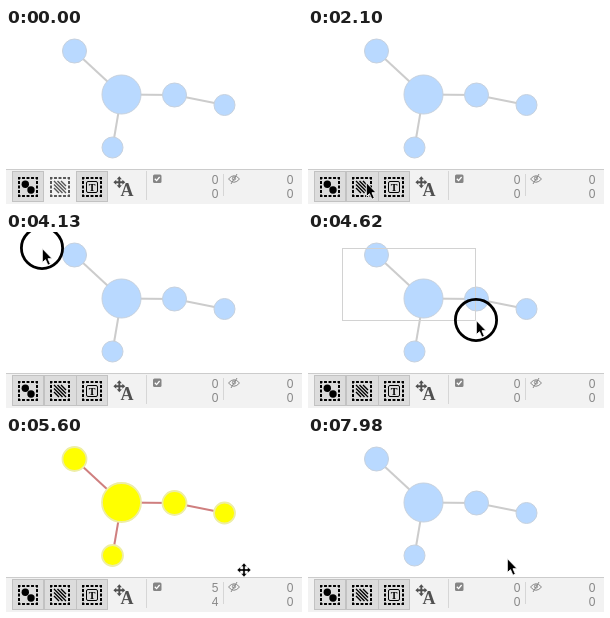
These frames come from a looping animation (296 px wide and 176 px high, 8 s). An HTML page:

```html
<!DOCTYPE html>
<html lang="en">
<head>
<meta charset="utf-8">
<title>Selecting nodes and edges</title>
<style>
  html, body { margin: 0; width: 100%; height: 100%; overflow: hidden; background: #fff; }
  svg { display: block; }
  .edge { stroke: #ccc; stroke-width: 2; }
  .node { fill: #b9d9ff; stroke: #c6d1de; stroke-width: 1; }
  .picked .edge { stroke: #cf7f7f; }
  .picked .node { fill: #ff0; stroke: #eeeea4; stroke-width: 1.8; }
  .button rect.back { fill: none; stroke: none; }
  .button.on rect.back { fill: #dcdcdc; stroke: #c2c2c2; }
  .button { color: #555; }
  .button.on { color: #000; }
  .dash { fill: none; stroke: currentColor; stroke-width: 2; stroke-dasharray: 2.9 1.6; stroke-dashoffset: 1.45; }
  .count { font: 12px "Liberation Sans", Arial, sans-serif; fill: #888; text-anchor: end; }
  .letter { font-family: "Liberation Serif", "Times New Roman", serif; font-weight: bold; text-anchor: middle; }
</style>
</head>
<body>
<svg width="296" height="176" viewBox="0 0 296 176">
  <defs>
    <path id="cross" d="M0-7 3-3.6H1.1V-1.1H3.6V-3L7 0 3.6 3V1.1H1.1V3.6H3L0 7-3 3.6H-1.1V1.1H-3.6V3L-7 0-3.6-3V-1.1H-1.1V-3.6H-3Z"/>
  </defs>

  <g id="graph"></g>
  <rect id="box" x="34.5" y="16.5" fill="none" stroke="#d2d2d2"/>

  <rect y="141" width="296" height="35" fill="#f2f2f2"/>
  <path d="M0 141.5H296" stroke="#ccc"/>

  <g class="button on">
    <rect class="back" x="6.5" y="143.5" width="31" height="30"/>
    <rect class="dash" x="13" y="150" width="18" height="18"/>
    <circle cx="19.3" cy="156.3" r="3.7"/>
    <circle cx="25" cy="162" r="3.7"/>
  </g>
  <g class="button" id="edgeButton">
    <rect class="back" x="38.5" y="143.5" width="32" height="30"/>
    <rect class="dash" x="45" y="150" width="18" height="18"/>
    <path d="M48 160 53 165M48 156.5 56.5 165M48 153 60 165M51.5 153 60 161.5M55 153 60 158" stroke="currentColor" stroke-width="1.4"/>
  </g>
  <g class="button on">
    <rect class="back" x="70.5" y="143.5" width="31" height="30"/>
    <rect class="dash" x="77" y="150" width="18" height="18"/>
    <rect x="80.5" y="153.5" width="11" height="11" rx="1.5" fill="none" stroke="#000"/>
    <text class="letter" x="86" y="162.5" font-size="10">T</text>
  </g>
  <g fill="#505050">
    <use href="#cross" transform="translate(113.3 154.3) scale(.85)"/>
    <text class="letter" x="121" y="168" font-size="18">A</text>
  </g>

  <path d="M140.5 143V172M217.5 146V168" stroke="#d6d6d6"/>
  <rect x="147" y="146.5" width="8.5" height="8.5" rx="1.5" fill="#858585"/>
  <path d="M148.8 150.8 150.6 152.6 153.6 149" fill="none" stroke="#fff" stroke-width="1.3"/>
  <g fill="none" stroke="#888">
    <path d="M222.5 151Q228 144.5 233.5 151Q228 157.5 222.5 151Z"/>
    <circle cx="228" cy="150.5" r="1.6"/>
    <path d="M231 146 225 156"/>
  </g>
  <text class="count" id="nodeCount" x="212.5" y="155.5">0</text>
  <text class="count" id="edgeCount" x="212.5" y="169.5">0</text>
  <text class="count" x="287.5" y="155.5">0</text>
  <text class="count" x="287.5" y="169.5">0</text>

  <g id="pointer">
    <circle id="ring" r="20.6" fill="none" stroke="#000" stroke-width="2.8"/>
    <path id="arrow" d="M.3.5V14.6L3.5 11.7 5.9 17.2 8.4 16.1 6 10.7H10.2Z" stroke="#fff" stroke-width=".9"/>
    <use id="mover" href="#cross" x="7" y="12" stroke="#fff" stroke-width=".5"/>
  </g>
</svg>
<script>
const LOOP = 8000, STEP = 70;
const el = id => document.getElementById(id);
const show = (id, on) => el(id).setAttribute('visibility', on ? 'visible' : 'hidden');

// x, y, radius; links join nodes by index
const nodes = [[68.5, 23, 12], [115.5, 66.5, 19.5], [168.5, 67, 12], [218.5, 77, 10.5], [106.5, 119.5, 10.5]];
const links = [[0, 1], [1, 2], [2, 3], [1, 4]];
el('graph').innerHTML =
  links.map(([a, b]) => {
    const [p, q] = [nodes[a], nodes[b]];
    return `<line class="edge" x1="${p[0]}" y1="${p[1]}" x2="${q[0]}" y2="${q[1]}"/>`;
  }).join('') +
  nodes.map(([x, y, r]) => `<circle class="node" cx="${x}" cy="${y}" r="${r}"/>`).join('');

// start, end, from, to, ease-out power
const moves = [
  [840, 1260, [102, 168], [58, 154], 1.6],
  [2520, 3500, [58, 154], [36, 16], 1.65],
  [4130, 5180, [36, 16], [231, 122], 1.8],
  [7770, 7980, [231, 122], [199, 122], 1]
];
const within = (t, a, b) => t >= a && t < b;

function place(t) {
  const [start, end, from, to, power] = moves.filter(m => t >= m[0]).pop() || moves[0];
  const p = Math.min(1, Math.max(0, (t - start) / (end - start)));
  const k = 1 - (1 - p) ** power;
  return from.map((v, i) => v + (to[i] - v) * k);
}

function draw(now) {
  const t = Math.floor((now % LOOP) / STEP) * STEP;
  const [x, y] = place(t).map(Math.round);
  const dragging = within(t, 4130, 5530);
  const picked = within(t, 5530, 7140);
  const counted = within(t, 5600, 7210);
  const seen = t >= 840;

  el('pointer').setAttribute('transform', `translate(${x} ${y})`);
  show('arrow', seen && !picked);
  show('mover', picked);
  show('ring', dragging || within(t, 1960, 2100) || within(t, 7000, 7140));
  show('box', dragging && t > 4130);
  el('box').setAttribute('width', Math.max(0, x - 35));
  el('box').setAttribute('height', Math.max(0, y - 16));

  el('graph').setAttribute('class', picked ? 'picked' : '');
  el('edgeButton').classList.toggle('on', t >= 2100);
  el('nodeCount').textContent = counted ? nodes.length : 0;
  el('edgeCount').textContent = counted ? links.length : 0;
}

function tick() {
  draw(performance.now());
  requestAnimationFrame(tick);
}
tick();
</script>
</body>
</html>
```
